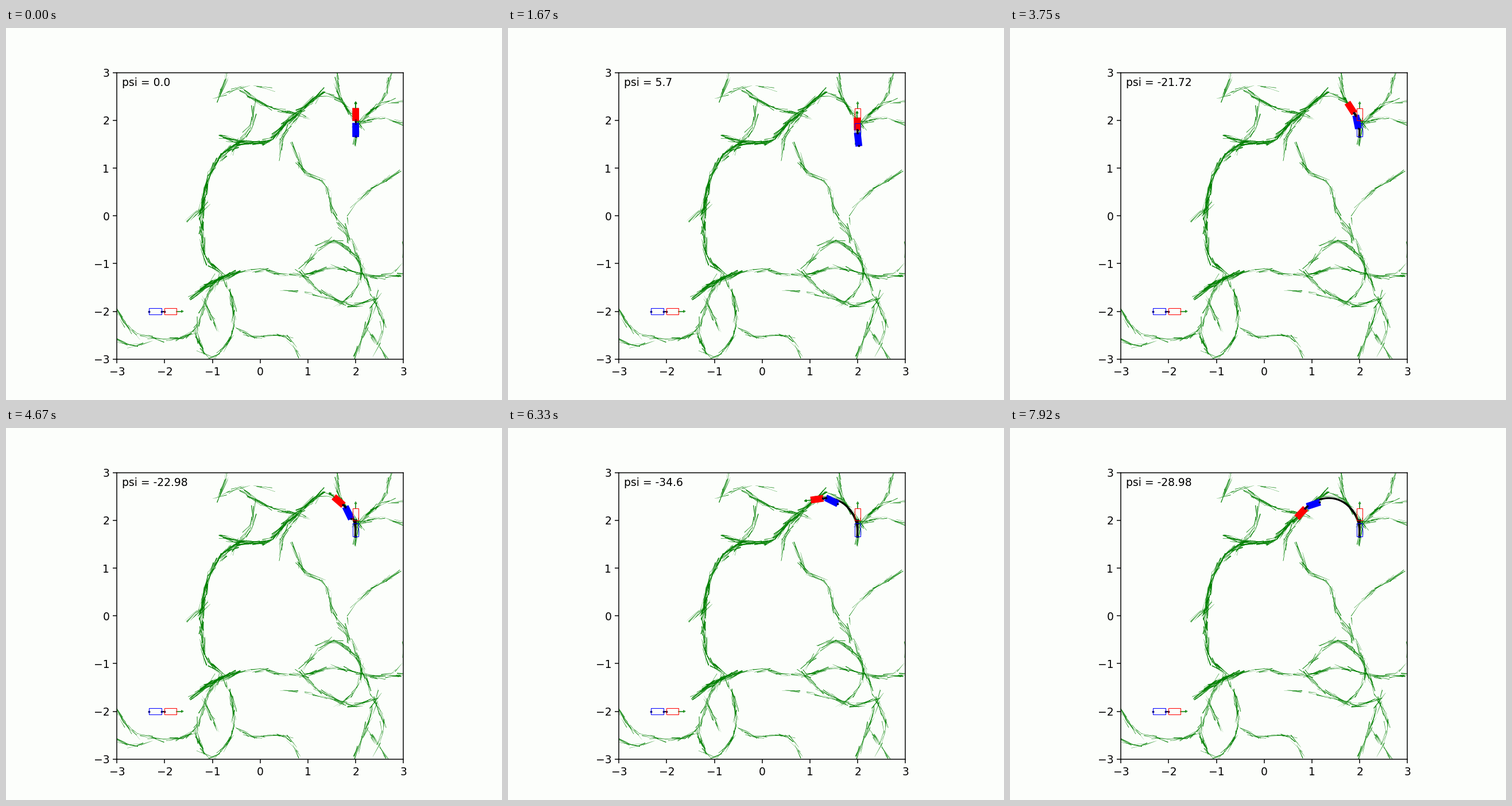
A matplotlib script for the animation above (8000 ms loop, 864 by 648 pixels).

```python
import numpy as np
import matplotlib.pyplot as plt
from matplotlib.animation import FuncAnimation
from matplotlib.collections import PolyCollection
from matplotlib.patches import Polygon

PAPER = "#fcfefb"
PX = 1 / 83.16      # one stage pixel in axis units
STEPS = 96          # simulation steps in one loop
FRAMES = 160
STRIDE = 0.025      # distance driven per step
CAB, HITCH, TRAILER, WIDTH = 0.25, 0.066, 0.27, 0.125

rng = np.random.default_rng(4)
fig, ax = plt.subplots(figsize=(6.4, 4.8), dpi=135, facecolor=PAPER)
ax.set_facecolor(PAPER)
ax.set(xlim=(-3, 3), ylim=(-3, 3), aspect="equal",
       xticks=range(-3, 4), yticks=range(-3, 4))


def unit(a):
    return np.array([np.cos(a), np.sin(a)])


# ---- roads: fine needles scattered along smooth curves ----

roads = []


def curve(*points):
    """Cubic through the points, sampled once per pixel."""
    p = np.array(points, float)
    d = np.r_[0, np.cumsum(np.hypot(*np.diff(p, axis=0).T))]
    m = np.gradient(p, d, axis=0)
    s = np.arange(0, d[-1], PX)
    i = np.searchsorted(d, s, "right") - 1
    h = (d[i + 1] - d[i])[:, None]
    t = (s - d[i])[:, None] / h
    return ((2*t**3 - 3*t**2 + 1) * p[i] + (t**3 - 2*t**2 + t) * h * m[i]
            + (3*t**2 - 2*t**3) * p[i + 1] + (t**3 - t**2) * h * m[i + 1])


def road(weight, *points):
    c = curve(*points)
    tangent = np.gradient(c, axis=0)
    for k in rng.integers(0, len(c), int(len(c) * weight / 3.6)):
        a = np.arctan2(tangent[k, 1], tangent[k, 0])
        a += rng.normal(0, 0.14) + np.pi * rng.integers(2)
        u, v = unit(a) * PX, unit(a + np.pi / 2) * PX
        mid = c[k] + v * rng.normal(0, 1 + 0.6 * weight)
        half = u * rng.uniform(6, 17)
        w = v * rng.uniform(0.15, 0.4 + 0.35 * weight)
        roads.append([mid - half - w, mid - half + w,
                      mid + half + w * 0.2, mid + half - w * 0.2])


# junction at the starting place
hub = (2.05, 1.93)
road(1, (1.25, 2.5), (1.45, 2.52), (1.78, 2.3), hub)
road(1, hub, (2, 1.55))
for mid, end in [((1.67, 2.5), (1.6, 3.1)), ((2.6, 2.5), (2.76, 3.1)),
                 ((2.6, 2.36), (3, 2.4)), ((2.55, 2.05), (3, 1.95))]:
    road(0.8, hub, mid, end)

# western trunk and its twigs
road(1.8, (1.25, 2.55), (0.6, 2), (0.1, 1.55), (-0.45, 1.52), (-1, 0.97),
     (-1.2, 0.2), (-1.22, -0.4), (-1.08, -0.95), (-0.7, -1.27))
road(1.6, (-0.8, 1.65), (-0.4, 1.55))
road(1, (-0.4, 2.63), (0.05, 2.35), (0.5, 2.2), (1.05, 2.06))
road(1, (-0.1, 2.4), (-0.2, 1.9), (-0.55, 1.4))
road(1, (-0.85, 2.5), (-0.68, 2.95))
road(0.35, (-0.85, 2.5), (-0.2, 2.75), (0.35, 2.6))
road(0.8, (0.42, 1.3), (0.47, 1.65), (0.8, 2.1))
road(1.2, (-1.48, -0.07), (-1.18, 0.2))

# eastern road and its loops
road(0.8, (0.7, 1.4), (0.9, 0.97), (1.35, 0.65), (1.53, 0.05), (1.9, -0.5),
     (2.12, -1.1), (2.4, -1.75), (2.58, -2.25), (2.42, -2.8))
road(0.7, (2.85, 0.9), (2.2, 0.45), (1.88, 0.1), (1.82, -0.5))
road(0.8, (0.9, -1.05), (1.5, -0.55), (2.1, -1), (1.95, -1.6), (1.65, -1.85))
road(0.6, (1.1, -0.65), (1.6, -0.55), (2, -0.85))
road(1, (0.85, -1.2), (1.4, -1.65), (1.95, -1.87), (2.45, -1.72))
road(0.4, (0.45, -1.55), (1.1, -1.63), (1.75, -1.83))
road(0.9, (2.45, -1.7), (2.25, -2.3), (1.95, -3))
road(0.6, (2.27, -2.4), (2.65, -3))

# southern crossing, loop and branches
road(1, (3, -1.25), (2.3, -1.25), (1.6, -1.1), (0.7, -1.25), (0, -1.15),
     (-0.75, -1.28), (-1.42, -1.7))
road(2, (-1.2, -1.5), (-0.55, -1.2))
road(0.4, (3, -0.55), (2.97, -1), (2.7, -1.28))
road(1, (-0.85, -1.25), (-1.15, -1.8), (-1.33, -2.5), (-1.05, -2.95),
     (-0.65, -2.6), (-0.57, -1.9), (-0.75, -1.3))
road(0.8, (-3, -1.95), (-2.7, -2.4), (-2.1, -2.57), (-1.45, -2.45),
     (-1.15, -1.9))
road(0.7, (-3, -2.6), (-2.7, -2.7), (-2.2, -2.56))
road(0.8, (-0.5, -2.35), (-0.15, -2.52), (0.55, -2.55), (0.8, -2.9))
road(0.8, (-1.2, -1.75), (-0.88, -2.4))

ax.add_collection(PolyCollection(roads, facecolor="green", edgecolor="none",
                                 zorder=1))


# ---- truck with trailer ----

def box(start, a, length):
    side = unit(a + np.pi / 2) * WIDTH / 2
    end = start + unit(a) * length
    return [start + side, end + side, end - side, start - side]


class Truck:
    def __init__(self, filled):
        thick = 0.8 if filled else 0.55
        z = 4 if filled else 5

        def part(color):
            face = color if filled else "none"
            return ax.add_patch(Polygon(np.zeros((4, 2)), fc=face, ec=color,
                                        lw=thick, zorder=z))

        def line(**style):
            return ax.plot([], [], zorder=4 if filled else 2, **style)[0]

        self.trailer, self.cab, self.head = map(part, ("blue", "red", "green"))
        self.shaft = line(color="green", lw=0.8)
        self.link = line(color="black", lw=1.6 if filled else 0.9)
        self.dots = line(color="#000030", marker="o", ls="", ms=1.6, mew=0.4)

    def place(self, pos, a, bend):
        b = a + bend
        hitch = pos - unit(a) * HITCH
        tail = hitch - unit(b) * TRAILER
        nose = pos + unit(a) * CAB
        neck = nose + unit(a) * 0.1
        side = unit(a + np.pi / 2) * 0.022
        self.cab.set_xy(box(pos, a, CAB))
        self.trailer.set_xy(box(tail, b, TRAILER))
        self.head.set_xy([neck + side, neck + unit(a) * 0.04, neck - side])
        self.shaft.set_data(*np.array([nose, neck]).T)
        self.link.set_data(*np.array([hitch, pos]).T)
        self.dots.set_data(*np.array([tail, hitch, pos]).T)


# ---- drive: reverse, forward, short reverse, forward ----

# step, cab heading and trailer angle in degrees
poses = [(0, 90, 0), (8, 88, 6.14), (14, 87, 10.4), (20, 91, 5.7),
         (34, 121, -23.75), (40, 132, -27.3), (46, 121, -20.6),
         (56, 139, -22.98), (76, 188, -34.6), (95, 227, -28.98)]
keys, turn, bend = np.transpose(poses)
step = np.arange(STEPS)
heading = np.radians(np.interp(step, keys, turn))
psi = np.interp(step, keys, bend)
gear = np.where((step < 14) | ((step >= 40) & (step < 46)), -1, 1)
mean = (heading[:-1] + heading[1:]) / 2
moves = STRIDE * gear[:-1, None] * unit(mean).T
path = np.vstack([[2, 2], [2, 2] + np.cumsum(moves, axis=0)])

trail, = ax.plot([], [], color="black", lw=1.7, zorder=3)
truck = Truck(filled=True)
Truck(filled=False).place(np.array([2, 2]), np.pi / 2, 0)
Truck(filled=False).place(np.array([-2, -2]), 0, 0)
label = ax.text(-2.9, 2.72, "")


def draw(frame):
    k = min(round(frame * STEPS / FRAMES), STEPS - 1)
    trail.set_data(*path[:k + 1].T)
    truck.place(path[k], heading[k], np.radians(psi[k]))
    label.set_text(f"psi = {round(float(psi[k]), 2)}")
    return trail, label


anim = FuncAnimation(fig, draw, frames=FRAMES, interval=50, repeat=True,
                     repeat_delay=0)
plt.show()
```
